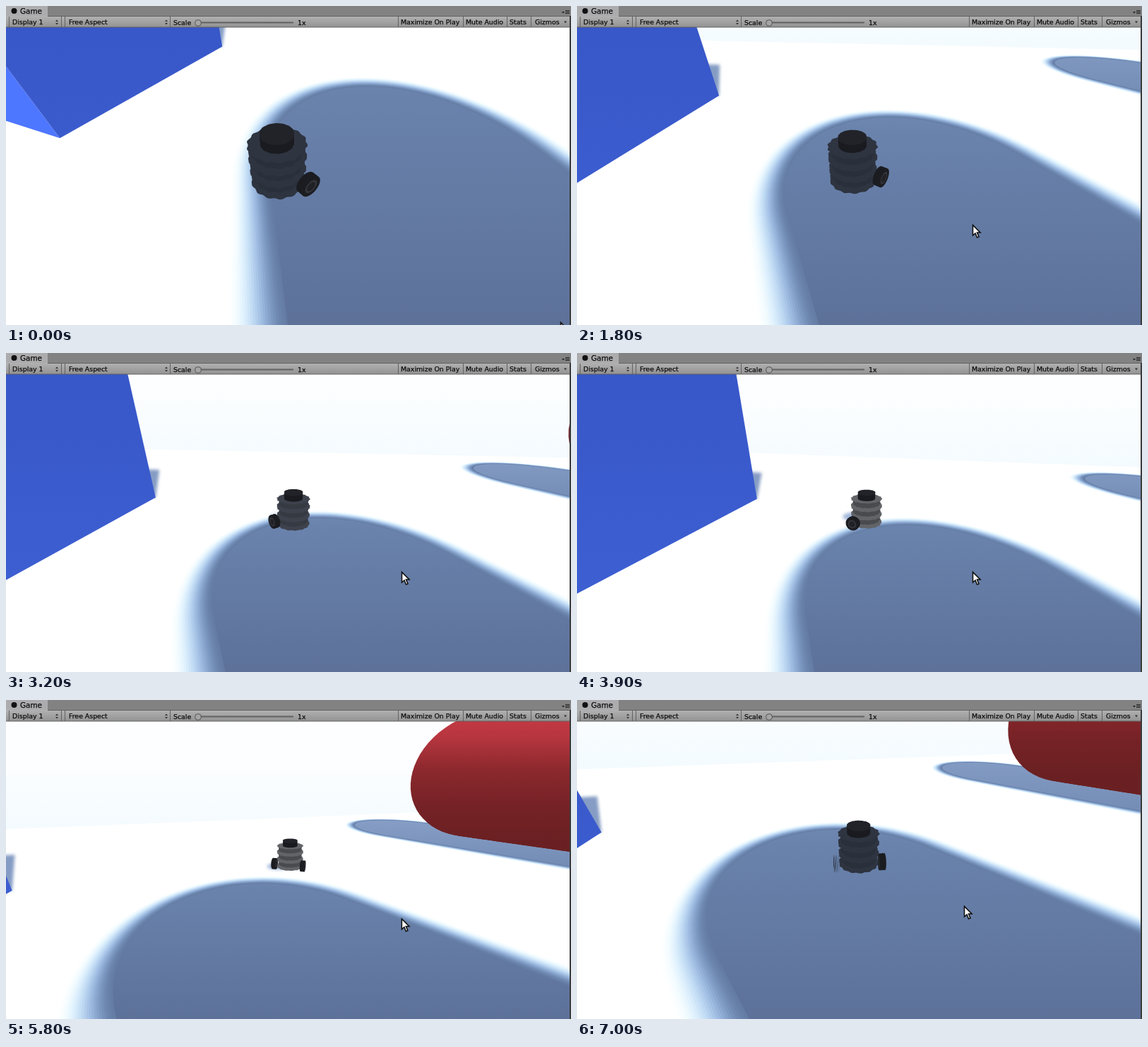
An HTML page with a canvas for the animation above (7.1 s loop, 800x452 px).

```html
<!DOCTYPE html>
<html>
<head>
<meta charset="utf-8">
<style>
html, body { margin: 0; width: 100%; height: 100%; overflow: hidden; background: #fff; }
canvas { display: block; }
</style>
</head>
<body>
<canvas id="stage" width="800" height="452"></canvas>
<script>
const ctx = document.getElementById('stage').getContext('2d');
const LOOP = 7100, STEP = 100;
const { sin, cos, hypot, PI } = Math;
const RAD = PI / 180;

// The camera stands still, one unit above the ground origin, and turns to follow the robot.
const CENTER_X = 400, CENTER_Y = 241, FOCAL = 365, NEAR = .05;

// time, bearing of the robot, its distance, angle of its axle to the screen
const ROUTE = [
  [0, -22, 1.036, 231], [1800, -6.7, 1.356, 215], [2300, 1.5, 1.8, 185],
  [3900, -12.9, 2.3, 112], [5000, 4.7, 2.3, 68], [5800, 14.2, 2.67, 15], [7000, 11.8, 1.576, -5]
];
const POINTER = [[0, 785, 448], [1500, 560, 310], [5700, 560, 310], [7000, 548, 292]];

// Ground layout as [x, z]; AWAY points along the sunlight, SIDE across it.
const AWAY = [-.5, .866], SIDE = [.866, .5];
const NEAR_SHADOW = [.23, 1.355], FAR_SHADOW = [3.43, 4.29];
const SHADOW_LENGTH = 1.1, SHADOW_WIDTH = .95, SOFTNESS = .11;
const CAPSULE = { x: 3.97, z: 3.52, r: .93 };
const CUBE = { x: -1.92, z0: .73, z1: 2.69, size: 1.96 };
const GROUND_EDGE = 6.1;

let cam;

const clamp = v => Math.max(0, Math.min(1, v));
const rgb = (c, k = 1) => `rgb(${c.map(v => Math.round(v * k))})`;
const range = (n, f) => Array.from({ length: n }, (_, i) => f(i));
const ring = (n, f) => range(n, i => f(i * 2 * PI / n));

// Smooth interpolation through key rows, without overshoot.
function follow(keys, t) {
  let i = 0;
  while (i < keys.length - 2 && t >= keys[i + 1][0]) i++;
  const a = keys[i], b = keys[i + 1], span = b[0] - a[0], u = clamp((t - a[0]) / span);
  return a.slice(1).map((from, k) => {
    const j = k + 1, to = b[j];
    const rate = n => keys[n] && keys[n + 1] && (keys[n + 1][j] - keys[n][j]) / (keys[n + 1][0] - keys[n][0]);
    const mid = rate(i);
    const slope = other => other === undefined ? mid : other * mid > 0 ? 2 * other * mid / (other + mid) : 0;
    const m0 = slope(rate(i - 1)) * span, m1 = slope(rate(i + 1)) * span;
    return from + u * (m0 + u * (3 * (to - from) - 2 * m0 - m1 + u * (2 * (from - to) + m0 + m1)));
  });
}

// View coordinates are [right, down, depth].
const tilt = (x, y, z) => [x, (1 - y) * cam.c - z * cam.s, z * cam.c + (1 - y) * cam.s];
const toView = ([x, y, z]) =>
  tilt(x * cos(cam.yaw) - z * sin(cam.yaw), y, x * sin(cam.yaw) + z * cos(cam.yaw));

function fillView(points, fill) {
  ctx.fillStyle = fill;
  ctx.beginPath();
  const plot = ([x, y, d]) => ctx.lineTo(CENTER_X + FOCAL * x / d, CENTER_Y + FOCAL * y / d);
  points.forEach((a, i) => {
    const b = points[(i + 1) % points.length];
    if (a[2] > NEAR) plot(a);
    if (a[2] > NEAR !== b[2] > NEAR) {
      const u = (NEAR - a[2]) / (b[2] - a[2]);
      plot(a.map((v, j) => v + (b[j] - v) * u));
    }
  });
  ctx.fill();
}
const face = (points, fill) => fillView(points.map(toView), fill);
const ground = (points, fill) => face(points.map(([x, z]) => [x, 0, z]), fill);
const shift = ([x, z], along, across = 0) =>
  [x + AWAY[0] * along + SIDE[0] * across, z + AWAY[1] * along + SIDE[1] * across];

function softly(blur, alpha, draw) {
  ctx.save();
  ctx.filter = `blur(${blur}px)`;
  ctx.globalAlpha = alpha;
  draw();
  ctx.restore();
}

function gradient(x0, y0, x1, y1, ...colors) {
  const g = ctx.createLinearGradient(x0, y0, x1, y1);
  colors.forEach((c, i) => g.addColorStop(i / (colors.length - 1), c));
  return g;
}

function drawBackdrop() {
  ctx.fillStyle = gradient(0, cam.horizon - 30, 0, cam.horizon + 80, '#fdfeff', '#f4fbfe');
  ctx.fillRect(0, 0, 800, 452);
  ground([[-40, GROUND_EDGE], [40, GROUND_EDGE], [40, -5], [-40, -5]], '#fff');
}

const shadowFill = () => gradient(0, cam.horizon + 70, 0, 452, '#859dc5', '#6a83ac', '#637aa3', '#5d7199');

// Nested outlines, from the outside in, form the penumbra.
function drawLongShadow(center) {
  for (let i = 0; i <= 24; i++) {
    const u = i / 24, e = u * u * (3 - 2 * u), grow = SOFTNESS * (1 - 2 * u);
    const l = SHADOW_LENGTH + grow, w = SHADOW_WIDTH + grow;
    const outline = range(41, k => shift(center, l * sin(k * PI / 40), w * cos(k * PI / 40)));
    ground([...outline, shift(center, -6, -w), shift(center, -6, w)],
      i < 24 ? rgb([255 - 155 * e, 255 - 131 * e ** 1.4, 255 - 92 * e ** 2.3]) : shadowFill());
  }
}

function drawCube({ x, z0, z1, size }) {
  const corner = [x, z1], end = shift(corner, 1.55);
  softly(2, 1, () => ground([corner, end, [end[0] - size, end[1]], [x - size, z1]], '#859cc4'));
  const wall = (ax, az, bx, bz, fill) =>
    face([[ax, 0, az], [bx, 0, bz], [bx, size, bz], [ax, size, az]], fill);
  wall(x - size, z0, x, z0, '#4e77ff');
  wall(x, z0, x, z1, gradient(0, 30, 0, 340, '#3857c8', '#3d5fd2'));
}

function drawSphere(center, r, fill) {
  const dist = hypot(...center), [a, b, c] = center.map(v => v / dist);
  const l = hypot(a, c), ux = c / l, uz = -a / l;
  const near = dist - r * r / dist, rim = r * Math.sqrt(1 - r * r / dist / dist);
  fillView(ring(60, t => {
    const p = rim * cos(t), q = rim * sin(t);
    return [a * near + p * ux + q * b * uz, b * near + q * (c * ux - a * uz), c * near + p * uz - q * b * ux];
  }), fill);
}

function drawCapsule({ x, z, r }) {
  const [, down, depth] = toView([x, r, z]);
  const y = CENTER_Y + FOCAL * down / depth;
  const fill = gradient(0, y - 110, 0, y + 90, '#cc3c46', '#b8363f', '#8a282d', '#752226', '#6a2022');
  for (let i = 0; i <= 40; i++) {
    const [cx, cz] = shift([x, z], -i / 16);
    drawSphere(toView([cx, r, cz]), r, fill);
  }
}

function drawRobot(dist, axle) {
  const ax = cos(axle), aq = sin(axle);
  const local = (right, closer, y) => tilt(right, y, dist - closer);
  const bodyX = .07 * aq, bodyQ = -.07 * ax;
  const disc = (r, y, bump, fill) => fillView(ring(84, t => {
    const k = r * (1 + bump * sin(14 * t));
    return local(bodyX + k * cos(t), bodyQ + k * sin(t), y);
  }), fill);
  const wheel = side => {
    const toward = Math.sign(aq) || 1;
    const slice = (offset, r, fill) => fillView(ring(30, t => {
      const m = side * .16 + offset * toward, f = r * cos(t);
      return local(ax * m + aq * f, aq * m - ax * f, .062 + r * sin(t));
    }), fill);
    for (let i = -3; i <= 3; i++) slice(i * .007, .062, '#1c1d21');
    slice(.021, .04, '#34363c');
    slice(.021, .028, '#202125');
  };

  const spot = [dist * sin(cam.yaw), dist * cos(cam.yaw)];
  const dx = spot[0] - NEAR_SHADOW[0], dz = spot[1] - NEAR_SHADOW[1];
  const along = dx * AWAY[0] + dz * AWAY[1], across = dx * SIDE[0] + dz * SIDE[1];
  const lit = clamp((hypot(Math.max(0, along) / SHADOW_LENGTH, across / SHADOW_WIDTH) - .8) / .2);
  const color = [46 + 52 * lit, 52 + 48 * lit, 64 + 40 * lit];
  const contrast = .08 + .17 * lit;

  const cast = shift(spot, .18);
  softly(2, lit * .8, () => ground(ring(24, t => [cast[0] + .12 * cos(t), cast[1] + .12 * sin(t)]), '#8ba5d0'));
  const farSide = aq > 0 ? -1 : 1;
  wheel(farSide);
  for (let i = 0; i <= 24; i++) {
    const plate = i % 8 < 3;
    disc(plate ? .142 : .125, .02 + i * .01, .03, rgb(color, plate ? 1 : 1 - contrast));
  }
  for (let y = .26; y < .325; y += .01) disc(.08, y, .01, y < .31 ? '#1a1b20' : '#222329');
  wheel(-farSide);
}

function poly(fill, ...p) {
  ctx.fillStyle = fill;
  ctx.beginPath();
  for (let i = 0; i < p.length; i += 2) ctx.lineTo(p[i], p[i + 1]);
  ctx.fill();
}

function dot(fill, x, y, r) {
  ctx.fillStyle = fill;
  ctx.beginPath();
  ctx.arc(x, y, r, 0, 7);
  ctx.fill();
}

function drawPointer(x, y) {
  ctx.save();
  ctx.translate(x, y);
  ctx.strokeStyle = '#111';
  ctx.lineWidth = 1.6;
  poly('#fff', .5, .5, .5, 15, 4, 12, 6.5, 18, 9, 17, 6.5, 11, 11, 11);
  ctx.closePath();
  ctx.stroke();
  ctx.restore();
}

function label(text, x, y = 26, size = 9.4) {
  ctx.font = `${size}px "DejaVu Sans", sans-serif`;
  ctx.fillStyle = ctx.strokeStyle = '#0c0c0c';
  ctx.lineWidth = .25;
  ctx.fillText(text, x, y);
  ctx.strokeText(text, x, y);
}

function drawToolbar() {
  ctx.fillStyle = '#828282';
  ctx.fillRect(0, 0, 800, 14);
  ctx.fillStyle = '#acacae';
  ctx.fillRect(0, 0, 59, 15);
  ctx.fillStyle = gradient(0, 14, 0, 30, '#b2b2b2', '#939393');
  ctx.fillRect(0, 14, 800, 16);
  ctx.fillStyle = '#626262';
  ctx.fillRect(59, 14, 741, 1);
  ctx.fillRect(0, 29.5, 800, 1);
  for (const x of [4, 78, 83, 232, 555, 647, 709, 743]) ctx.fillRect(x, 15, 1, 15);
  ctx.fillRect(272, 22.5, 135, 2);
  dot('#555', 272, 24, 4.8);
  dot('#a5a5a5', 272, 24, 3.8);
  for (const x of [72, 227]) {
    poly('#333', x - 2, 22, x + 2, 22, x, 19.5);
    poly('#333', x - 2, 24, x + 2, 24, x, 26.5);
  }
  poly('#333', 790, 21.5, 794, 21.5, 792, 24.5);
  poly('#222', 787, 8, 791, 8, 789, 10.5);
  for (const y of [6, 8, 10]) ctx.fillRect(792, y, 6, 1);
  dot('#111', 11.5, 7, 4);
  label('Game', 20, 11, 10.4);
  label('Display 1', 9);
  label('Free Aspect', 89);
  label('Scale', 237, 27);
  label('1x', 413, 27);
  label('Maximize On Play', 559);
  label('Mute Audio', 651);
  label('Stats', 713);
  label('Gizmos', 749);
  ctx.fillStyle = '#3c3c3c';
  ctx.fillRect(798, 14, 2, 438);
}

function frame(now) {
  const t = Math.floor(now % LOOP / STEP) * STEP;
  const [bearing, dist, axle] = follow(ROUTE, t);
  const pitch = Math.atan(1 / dist);
  cam = { yaw: bearing * RAD, s: sin(pitch), c: cos(pitch), horizon: CENTER_Y - FOCAL / dist };
  drawBackdrop();
  drawLongShadow(FAR_SHADOW);
  drawLongShadow(NEAR_SHADOW);
  drawCapsule(CAPSULE);
  drawCube(CUBE);
  drawRobot(dist, axle * RAD);
  drawPointer(...follow(POINTER, t));
  drawToolbar();
}

const start = performance.now();
function tick() {
  frame(performance.now() - start);
  requestAnimationFrame(tick);
}
tick();
</script>
</body>
</html>
```
